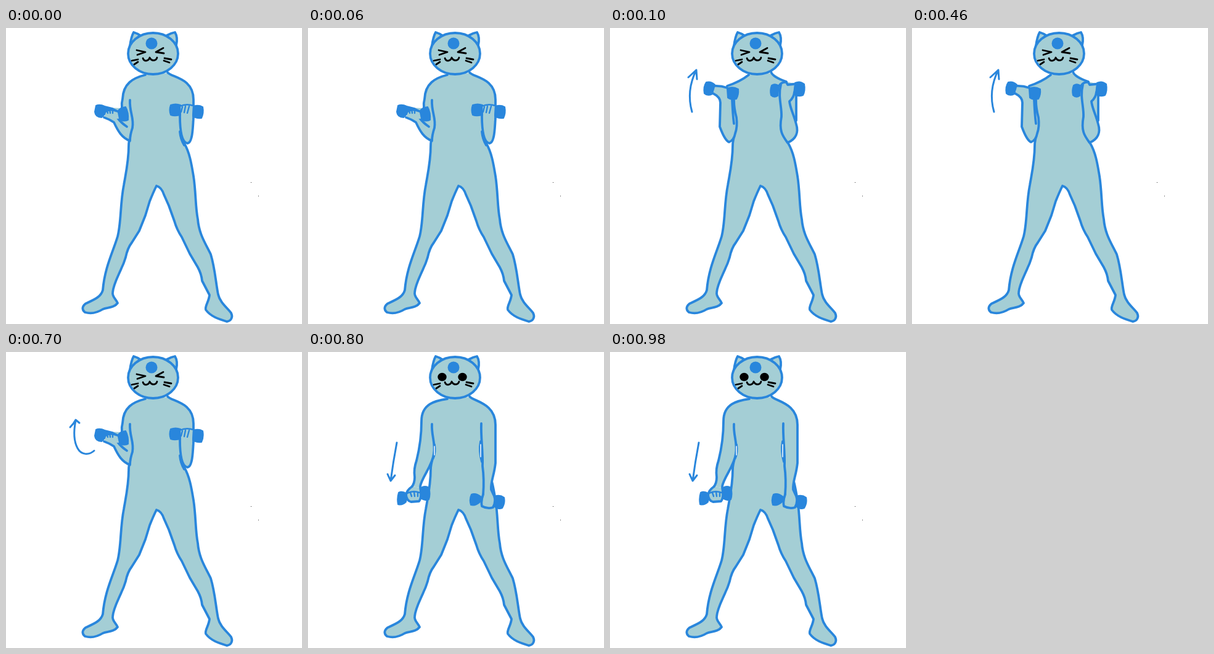
Animation of 480 by 480 pixels, one loop 1100 ms. Source, as an HTML page:

```html
<!DOCTYPE html>
<html lang="en">
<head>
<meta charset="utf-8">
<title>Cat curls</title>
<style>
html, body { margin: 0; height: 100%; overflow: hidden; background: #fff; }
svg { display: block; width: 480px; height: 480px; }
path, .both { fill: none; stroke: #2986dc; stroke-width: 3.8; stroke-linecap: round; stroke-linejoin: round; }
.skin { fill: #a4ced5; stroke: none; }
.both { fill: #a4ced5; }
.weight { fill: #2986dc; stroke-width: 2; }
.thin { stroke-width: 2.4; }
.arrow { stroke-width: 3; }
.gap { stroke: #fff; stroke-width: 1.5; }
.ink { stroke: #000; stroke-width: 2.8; }
.speck { fill: #333; stroke: none; }
</style>
</head>
<body>
<svg viewBox="0 0 480 480">
  <!-- torso and legs -->
  <path class="both" d="M205 160C203 172 199 180 199 190C199 215 195 232 191 255C185 285 187 315 181 338C174 362 160 388 157 425C154 436 144 440 129 447C123 452 123 457 128 461C138 464 149 461 157 456C165 453 175 454 181 446C178 439 172 436 173 429C174 416 182 402 187 390Q191 382 194 372Q197 357 204 348L216 329L226 304L233 281Q239 266 244 256Q252 258 256 270L264 288L273 313Q277 327 285 339L298 366L311 388Q317 399 318 410L330 433C329 444 322 451 324 457C332 468 345 472 358 476C366 475 368 468 365 462C358 453 347 445 344 432C340 412 339 390 332 367C324 350 313 335 311 310C307 290 308 265 304 240C301 222 298 202 289 187Q283 180 283 168"/>

  <g data-on="mid">
    <path class="skin" d="M201 183C188 178 181 165 173 152L160 145 162 129 187 130 189 115C190 92 206 82 226 76L263 73C292 82 304 95 304 125V145C303 170 301 187 293 187C285 184 281 165 282 143L283 172 205 172Z"/>
    <path d="M226 76C206 81 190 90 189 115Q187 122 188 130M201 117C200 137 208 145 205 162Q201 174 201 183C188 178 182 168 175 153Q168 148 159 145M181 146Q187 154 196 160M262 72C267 80 304 80 304 116V126M304 145C303 165 302 187 294 187C285 185 282 166 282 142M282 168Q283 180 289 190"/>
    <path class="weight" d="M146 126Q152 123 160 127L172 130 182 135Q184 129 194 128Q199 137 198 149Q190 153 184 147L181 142 161 139 155 145Q145 145 144 136Z"/>
    <path class="skin" d="M162 137Q169 132 181 137L183 147 171 148 160 143Z"/>
    <path class="thin" d="M163 130L165 138M168 130L169 138M173 131V138"/>
    <path class="weight" d="M267 125Q275 122 283 125L284 140Q275 144 267 141Q264 133 267 125ZM304 127Q312 124 319 128Q321 138 317 146Q308 147 303 143Z"/>
    <path class="both thin" d="M282 127Q292 122 304 126L303 143 283 141Z"/>
    <path class="thin" d="M286 128L284 136M291 127L289 137M297 127L294 138"/>
    <path class="skin" d="M284 139H302V150H284Z"/>
  </g>

  <g data-on="up">
    <path class="skin" d="M225 76Q211 87 189 95L169 94 168 106 179 117 178 163Q186 185 195 185L205 172H278L289 186C303 177 304 168 302 150V108L298 90 286 87 263 73Z"/>
    <path d="M225 76Q211 87 190 94M167 94Q179 93 190 97M167 106Q179 112 179 121L178 160Q186 182 193 185Q201 182 203 171Q207 160 205 145Q201 130 201 117M198 115Q199 140 201 155M261 71Q264 80 286 87"/>
    <path d="M274 94Q278 87 286 88L288 92 298 91M277 92C272 112 279 128 278 144C274 166 279 174 288 186C302 180 306 169 302 156C298 140 292 130 291 119Q298 113 299 104M302 108V150"/>
    <path class="weight" d="M156 88Q164 86 170 92L166 107Q158 111 153 106Q151 95 156 88ZM190 98Q199 94 208 99Q209 108 205 115Q196 117 191 113ZM262 93Q268 89 274 94L272 110Q266 114 261 109Q259 101 262 93ZM300 89Q308 85 315 91Q317 102 313 109Q304 112 298 107Z"/>
  </g>

  <g data-on="down">
    <path class="skin" d="M226 76C206 79 184 84 184 112C184 135 180 160 176 176Q171 190 173 203L169 218 182 220C184 203 202 187 204 165L205 172H281L285 232H302L297 222C303 200 304 170 304 120C303 95 293 82 263 73Z"/>
    <path d="M226 76C206 79 184 84 184 112C184 135 180 160 176 176Q171 190 173 203Q173 213 168 219M201 117C200 137 207 146 204 165C202 184 184 204 182 218M205 150Q207 163 203 172M262 72C267 80 304 82 304 118V180C302 200 296 210 297 223L302 234M281 116C280 140 284 160 283 185Q286 207 284 231M280 145Q277 160 282 178"/>
    <path class="gap" d="M205 153V167M280 150V170"/>
    <path class="weight" d="M147 228Q153 225 160 230L159 243Q153 249 146 247Q144 237 147 228ZM183 220Q190 216 196 220Q199 230 196 239Q189 242 183 237ZM265 231Q272 228 281 235L279 243Q272 250 264 248Q261 239 265 231ZM303 234Q311 231 318 236Q320 245 315 253Q308 256 302 250Z"/>
    <path class="both" d="M169 218Q160 224 159 232Q160 241 167 243L180 242Q185 236 182 220M284 231Q280 242 282 250Q291 255 300 252Q305 243 302 234"/>
    <path class="thin" d="M161 229Q170 224 181 228M166 228L168 234M172 227L173 234M178 228V234"/>
  </g>

  <!-- head -->
  <path class="both" d="M201 29Q203 14 207 7Q214 9 219 13L225 30M257 30L261 12Q268 8 274 7Q279 15 276 28"/>
  <ellipse class="both" cx="238.5" cy="41.5" rx="40.5" ry="33.5"/>
  <circle cx="236" cy="25" r="9.5" fill="#2986dc"/>
  <path class="ink" d="M222 49C224 55 231 54 233 48C236 54 243 54 245 48M204 53L214 51M208 59L214 55M257 49L268 51M256 53L265 56"/>
  <path class="ink" data-on="mid up" d="M212 36L226 39 213 43.5M255 32.5L243 39 256 41"/>
  <g data-on="down"><ellipse cx="217.5" cy="40.5" rx="7.2" ry="6.7"/><ellipse cx="250.5" cy="40.5" rx="7.2" ry="6.7"/></g>

  <path class="arrow" data-on="up" d="M133 136C127 115 128 92 140 68M127 80L140 68 141 83"/>
  <path class="arrow" data-on="swing" d="M143 160C134 168 122 167 116 156C109 143 110 126 113 111M104 122Q110 116 113 110L119 115"/>
  <path class="arrow" data-on="down" d="M144 147Q138 179 134 209M129 198L134 209 141 200"/>
  <path class="speck" d="M397 250h1v1h-1zM409 272h1v1h-1z"/>
</svg>
<script>
const parts = [...document.querySelectorAll('[data-on]')];
const steps = [[100, 'mid'], [700, 'up'], [800, 'mid swing'], [1100, 'down']];

function draw(now) {
  const t = now % 1100;
  const active = steps.find(([end]) => t < end)[1].split(' ');
  for (const part of parts) {
    const shown = part.dataset.on.split(' ').some(name => active.includes(name));
    part.style.display = shown ? '' : 'none';
  }
}

const start = performance.now();
function tick() {
  draw(performance.now() - start);
  requestAnimationFrame(tick);
}
tick();
</script>
</body>
</html>
```
